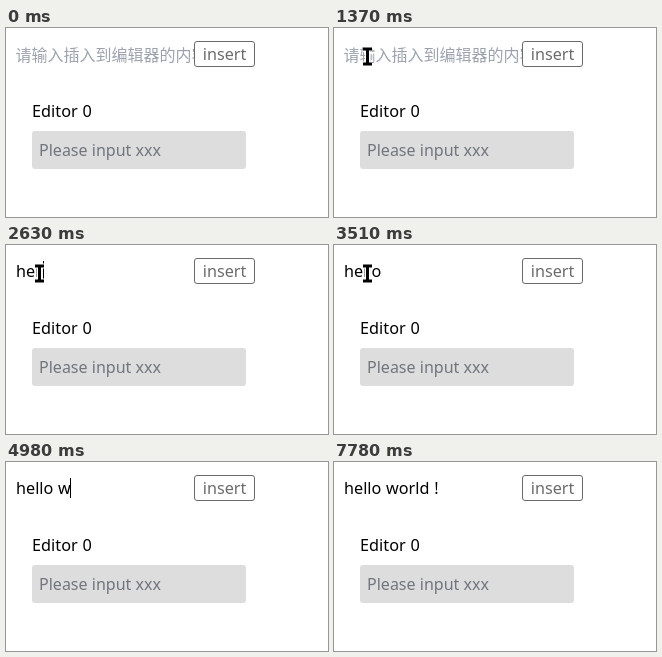
An HTML page for the animation above (8 s loop, 322 by 189 pixels).

```html
<!DOCTYPE html>
<html lang="zh-CN">
<head>
<meta charset="utf-8">
<title>Editor insert</title>
<style>
  html, body { margin: 0; width: 100%; height: 100%; overflow: hidden; background: #fff; }
  body { position: relative; font: 16.2px/24px "Noto Sans", "Noto Sans CJK SC", "Noto Sans CJK", sans-serif; color: #000; }
  body > * { position: absolute; box-sizing: border-box; white-space: pre; }
  #field { left: 10px; top: 14px; width: 178px; height: 24px; overflow: hidden; word-spacing: .6px; }
  #hint { position: absolute; left: -.5px; color: #9ca3af; font: 16px/24px "Noto Sans CJK SC", "Noto Sans CJK", sans-serif; }
  #caret { position: absolute; top: 2px; width: 1px; height: 20px; margin-left: -.5px; background: #000; }
  #hint, #caret, #click, #beam, #arrow { visibility: hidden; }
  .button { left: 188px; top: 13px; width: 61px; height: 26px; border: 1px solid #6b6b6b; border-radius: 3px; background: #fff; color: #6b6b6b; text-align: center; }
  .label { left: 26px; top: 71px; font-size: 16.3px; word-spacing: .5px; }
  .editor { left: 26px; top: 103px; width: 214px; height: 38px; padding: 7px; border-radius: 3px; background: #ddd; color: #70757e; font-size: 16.05px; }
  svg { left: 0; top: 0; width: 322px; height: 189px; pointer-events: none; }
</style>
</head>
<body>
<div id="field"><span id="hint">请输入插入到编辑器的内容</span><span id="text"></span><i id="caret"></i></div>
<div class="button">insert</div>
<div class="label">Editor 0</div>
<div class="editor">Please input xxx</div>
<svg viewBox="0 0 322 189">
  <circle id="click" cx="33" cy="28" r="12" fill="#ff0" fill-opacity=".47"/>
  <g id="beam" fill="none">
    <path stroke="#fff" stroke-width="5" d="M-4-7H5M.5-8V8M-4 8H5"/>
    <path stroke="#000" stroke-width="3" d="M-4-7H5M.5-7V8M-4 8H5"/>
  </g>
  <path id="arrow" stroke="#fff" d="M.5.5V16.5L4 13l2.5 5.5 2.5-1L6.5 12h5z"/>
</svg>
<script>
const LOOP = 8000, BLINK = 530;
const MESSAGE = 'hello world !';
const FOCUS = 840;
const keyTimes = [1500, 1900, 2560, 2630, 2760, 2980, 4980, 5180, 5400, 6190, 6320, 6920, 7250];

// time, shape, x, y
const pointer = [
  [0, ''],
  [200, 'arrow', 212, 142], [270, 'beam', 165, 113], [340, 'arrow', 110, 72],
  [410, 'arrow', 73, 48], [480, 'beam', 52, 35], [550, 'beam', 40, 30], [620, 'beam', 33, 28],
  [3970, 'beam', 62, 31], [4040, 'arrow', 150, 41], [4110, 'arrow', 257, 50],
  [4180, '']
];

const el = id => document.getElementById(id);
const show = (id, on) => { el(id).style.visibility = on ? 'visible' : 'hidden'; };

function draw(t) {
  const typed = keyTimes.filter(k => k <= t).length;
  const lastAction = typed ? keyTimes[typed - 1] : FOCUS;
  el('text').textContent = MESSAGE.slice(0, typed);
  show('hint', !typed);
  show('caret', t >= FOCUS && Math.floor((t - lastAction) / BLINK) % 2 === 0);
  show('click', t >= FOCUS && t < 1040);

  const [, shape, x, y] = pointer.findLast(p => p[0] <= t);
  for (const id of ['beam', 'arrow']) show(id, id === shape);
  if (shape) el(shape).setAttribute('transform', `translate(${x} ${y})`);
}

function tick() {
  draw(performance.now() % LOOP);
  requestAnimationFrame(tick);
}
tick();
</script>
</body>
</html>
```
